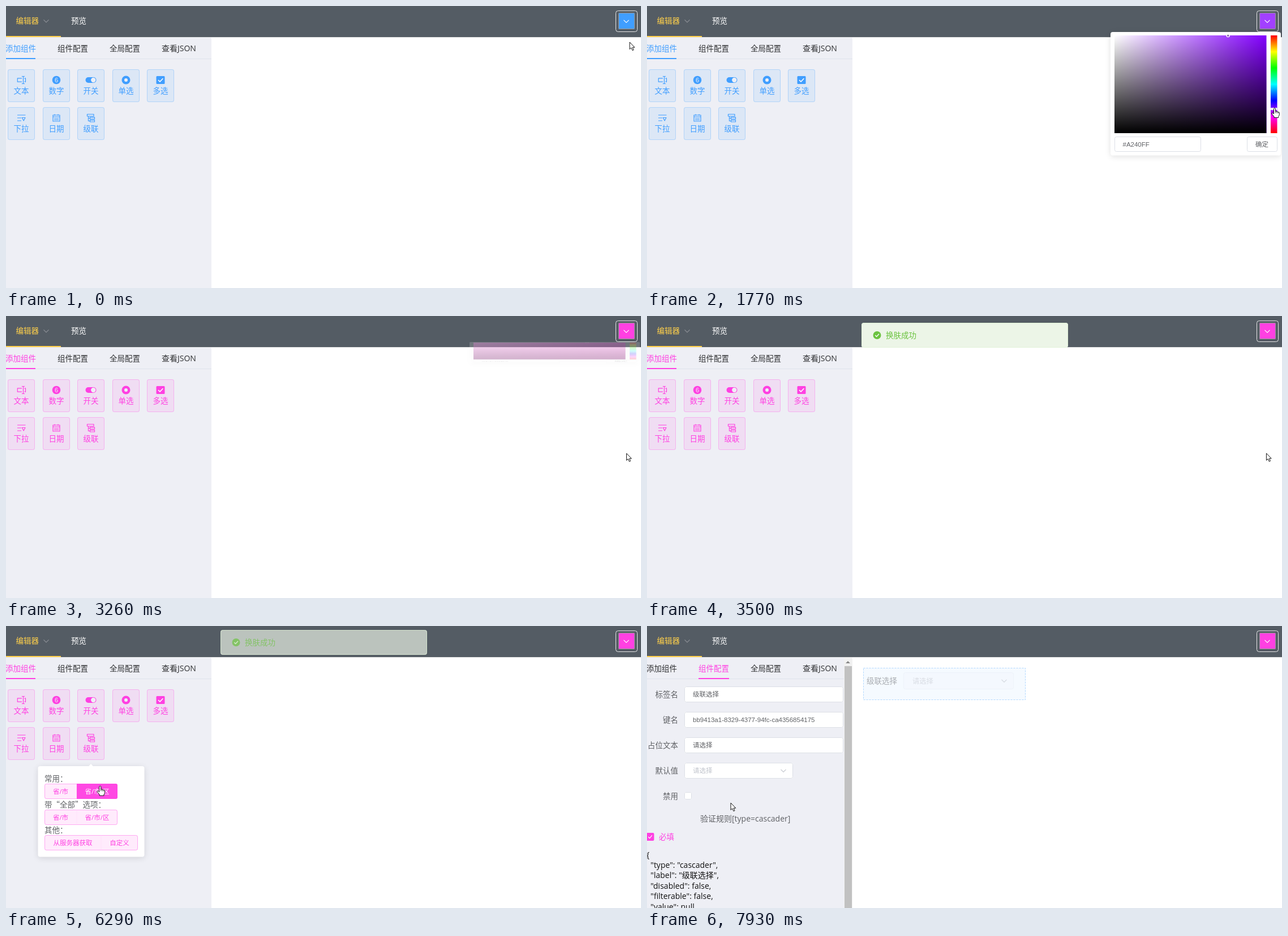
These frames come from a looping animation (1122 by 499 pixels, 8000 ms). An HTML page with a canvas:

```html
<!DOCTYPE html>
<html lang="zh-CN">
<head>
<meta charset="utf-8">
<style>
html, body { margin: 0; width: 100%; height: 100%; overflow: hidden; background: #fff; }
canvas { display: block; }
</style>
</head>
<body>
<canvas id="stage" width="1122" height="499"></canvas>
<script>
const ctx = document.getElementById('stage').getContext('2d');
const LOOP = 8000;
const CJK = '"Noto Sans CJK SC", sans-serif';
const MIXED = '"Open Sans", ' + CJK;
const ARIAL = '"Liberation Sans", ' + CJK;
const BLUE = [64, 158, 255];
const PANEL = '#eeeff5', DARK = '#303133', GREY = '#606266', LINE = '#dcdfe6', PALE = '#c0c4cc';

// Cursor hot spot: time, x, y
const CURSOR = [
  [70, 1102, 64], [380, 1092, 27], [620, 1092, 27], [850, 1090, 39], [1390, 1109, 154],
  [1460, 1109, 156], [1930, 1109, 193], [2240, 1109, 193], [2330, 1109, 196], [2480, 1109, 200],
  [2940, 1097, 243], [3500, 1096, 243], [3960, 366, 196], [4300, 235, 160], [4810, 180, 204],
  [5040, 167, 215], [5120, 165, 216], [5270, 163, 220], [5510, 150, 255], [5660, 115, 300],
  [5900, 105, 366], [6140, 100, 292], [6280, 166, 283], [6430, 170, 285], [6600, 198, 268],
  [6820, 120, 366], [6920, 95, 340], [7070, 95, 340], [7300, 160, 340], [7450, 152, 336],
  [7610, 152, 336], [7930, 148, 313]
];
const HUE = [[1390, 210.47], [1930, 296], [2240, 296], [2330, 302], [2480, 309.1]];

const circle = (r, x = 0) => `M${x - r} 0a${r} ${r} 0 1 0 ${2 * r} 0a${r} ${r} 0 1 0 ${-2 * r} 0Z`;
const COMPONENTS = [
  { name: '文本', line: 'M1-3.2H-6.7V3.2H1M.8-6.5H6.2M3.5-6.5V6.5M.8 6.5H6.2M5.5-3.2H7.5V3.2H5.5' },
  { name: '数字', fill: circle(7.3), digit: '6' },
  { name: '开关', fill: 'M-4.5-5H4.5a5 5 0 0 1 0 10H-4.5a5 5 0 0 1 0-10Z', hole: circle(4.2, 4.3) },
  { name: '单选', fill: circle(7.5), hole: circle(3) },
  { name: '多选', fill: 'M-6-7H6Q7.5-7 7.5-5.5V5.5Q7.5 7 6 7H-6Q-7.5 7-7.5 5.5V-5.5Q-7.5-7-6-7Z', tick: 'M-4 0L-1 3L4.3-2.8' },
  { name: '下拉', line: 'M-7-5H7.5M-7 0H0M-7 5H0M1.3-.5H7L4.2 5Z' },
  { name: '日期', line: 'M-6-5H6V6H-6ZM-6-2H6M-3-6.5V-4M3-6.5V-4M-4 1H4M-4 3.5H4' },
  { name: '级联', line: 'M-6.5-6.5H5V-3H-6.5ZM-1.5-1.2H6.5V2H-1.5ZM-1.5 3.8H6.5V7H-1.5ZM-4.5-3V5.5H-1.5M-4.5.5H-1.5' }
];
const POPOVER = [
  { y: 279, title: '常用：', items: [['省/市', 68, 57], ['省/市/区', 125, 72]] },
  { y: 325, title: '带“全部”选项：', items: [['省/市', 68, 57], ['省/市/区', 125, 72]] },
  { y: 370, title: '其他：', items: [['从服务器获取', 68, 100], ['自定义', 168, 65]] }
];
const JSON_LINES = ['{', '  "type": "cascader",', '  "label": "级联选择",', '  "disabled": false,', '  "filterable": false,', '  "value": null,'];

let now, theme, hotAreas;

const clamp = v => Math.max(0, Math.min(1, v));
const progress = (start, length) => clamp((now - start) / length);
const mix = (a, b, p) => a + (b - a) * p;
const rgb = (c, a = 1) => `rgba(${c.join()},${a})`;

function track(keys, t) {
  const i = keys.findIndex(k => k[0] > t);
  if (i === 0) return keys[0].slice(1);
  if (i < 0) return keys[keys.length - 1].slice(1);
  const a = keys[i - 1], b = keys[i];
  return a.slice(1).map((v, n) => mix(v, b[n + 1], (t - a[0]) / (b[0] - a[0])));
}

// CSS "ease" curve
function ease(p) {
  let lo = 0, hi = 1, u;
  for (let i = 0; i < 20; i++) {
    u = (lo + hi) / 2;
    if (.75 * u * (1 - u) + u ** 3 < p) lo = u; else hi = u;
  }
  return .3 * (1 - u) ** 2 * u + 3 * (1 - u) * u * u + u ** 3;
}

// Hue to RGB; low is the smallest channel value
function hueColor(h, low) {
  return [5, 3, 1].map(n => {
    const k = (n + h / 60) % 6;
    return Math.round(255 - (255 - low) * Math.max(0, Math.min(k, 4 - k, 1)));
  });
}

function box(x, y, w, h, fill, border, r = 3) {
  ctx.beginPath();
  ctx.roundRect(x, y, w, h, r);
  ctx.fillStyle = fill;
  ctx.fill();
  if (!border) return;
  ctx.beginPath();
  ctx.roundRect(x + .5, y + .5, w - 1, h - 1, r);
  ctx.strokeStyle = border;
  ctx.lineWidth = 1;
  ctx.stroke();
}

function text(s, x, cy, color, size = 13.5, align = 'left', font = CJK) {
  ctx.font = `${size}px ${font}`;
  ctx.textAlign = align;
  ctx.fillStyle = color;
  ctx.fillText(s, x, cy + size * .37);
}

function path(d, x, y, fill, stroke, width = 1.2) {
  ctx.save();
  ctx.translate(x, y);
  const p = new Path2D(d);
  if (fill) { ctx.fillStyle = fill; ctx.fill(p); }
  if (stroke) { ctx.strokeStyle = stroke; ctx.lineWidth = width; ctx.stroke(p); }
  ctx.restore();
}

const chevron = (x, y, color) => path('M-4.5-2.2L0 2.3L4.5-2.2', x, y, null, color, 1.1);

function layer(alpha, draw) {
  if (alpha <= 0) return;
  ctx.save();
  ctx.globalAlpha = alpha;
  draw();
  ctx.restore();
}

function floating(draw, alpha = .12) {
  ctx.save();
  ctx.shadowColor = `rgba(0,0,0,${alpha})`;
  ctx.shadowBlur = 11;
  ctx.shadowOffsetY = 2;
  draw();
  ctx.restore();
}

const inside = ([px, py], [x, y, w, h]) => px >= x && px < x + w && py >= y && py < y + h;

// Share of the last 100 ms spent over an area
function hoverAmount(area) {
  let n = 0;
  for (let i = 0; i < 10; i++) n += inside(track(CURSOR, now - i * 10), area);
  return n / 10;
}

function drawHeader(picked) {
  box(0, 0, 1122, 55, '#545c64', null, 0);
  box(0, 55, 1122, 1, '#e6e6e6', null, 0);
  box(0, 53, 97, 2, '#ffd04b', null, 0);
  text('编辑器', 17.5, 26.5, '#ffd04b');
  chevron(71, 26.5, '#909399');
  text('预览', 115, 26.5, '#fff');
  box(1077, 8, 39, 38, 'transparent', '#e6e6e6', 4);
  box(1082, 12, 29, 29, rgb(picked), '#999', 2);
  chevron(1096, 27, '#fff');
  hotAreas.push([1077, 8, 39, 38]);
}

function drawTabs(active) {
  box(0, 55, 363, 444, PANEL, null, 0);
  box(0, 93, 363, 1, '#dfe3ec', null, 0);
  const slide = ease(progress(7630, 280));
  box(mix(-1, 91, slide), 92, mix(53, 54, slide), 2, rgb(theme), null, 0);
  [['添加组件', -1], ['组件配置', 91], ['全局配置', 183], ['查看JSON', 275, 14]].forEach(([s, x, size], i) =>
    text(s, x, 75, i === active ? rgb(theme) : DARK, size, 'left', MIXED));
}

function drawComponents() {
  const color = rgb(theme);
  COMPONENTS.forEach((c, i) => {
    const x = Math.round(3 + i % 5 * 61.6), y = i < 5 ? 112 : 179, cx = x + 24, cy = y + 19;
    box(x, y, 48, 58, rgb(theme, .1), rgb(theme, .27));
    path(c.line || c.fill, cx, cy, c.fill && color, c.line && color);
    if (c.hole) path(c.hole, cx, cy, PANEL);
    if (c.tick) path(c.tick, cx, cy, null, '#fff', 1.6);
    if (c.digit) text(c.digit, cx, cy, PANEL, 11, 'center', ARIAL);
    text(c.name, cx, y + 38, color, 13.5, 'center');
    hotAreas.push([x, y, 48, 58]);
  });
}

function drawConfig() {
  const rows = [['标签名', '级联选择', 281], ['键名', 'bb9413a1-8329-4377-94fc-ca4356854175', 281],
    ['占位文本', '请选择', 281], ['默认值', '请选择', 192]];
  rows.forEach(([label, value, w], i) => {
    const cy = 121 + i * 45;
    text(label, 55, cy, GREY, 13.5, 'right');
    box(66, cy - 14, w, 28, '#fff', LINE);
    text(value, 81, cy, i === 3 ? PALE : GREY, 11.5, 'left', ARIAL);
  });
  chevron(241, 256, PALE);
  text('禁用', 55, 301, GREY, 13.5, 'right');
  box(66, 294, 13, 13, '#fff', LINE, 2);
  text('验证规则[type=cascader]', 94, 340.5, GREY, 14, 'left', MIXED);
  box(-1, 366, 13.5, 14, rgb(theme), null, 2);
  path('M-3.2 0L-.8 2.6L3.4-2.6', 5.5, 373, null, '#fff', 1.2);
  text('必填', 21, 373, rgb(theme));
  JSON_LINES.forEach((s, i) => text(s, -1, 404.5 + i * 18.4, '#111', 14, 'left', MIXED));
  box(348, 55, 15, 444, '#f1f1f1', null, 0);
  box(349, 71, 13, 428, '#c1c1c1', null, 0);
  path('M-4 2L0-2L4 2Z', 355, 64, '#858585');
}

function drawFormItem() {
  layer(.5 * progress(7700, 230), () => {
    box(382, 74, 287, 57, '#ecf5ff', null, 2);
    ctx.setLineDash([3, 2]);
    ctx.strokeStyle = '#6db5ff';
    ctx.lineWidth = 1;
    ctx.strokeRect(382.5, 74.5, 286, 56);
    ctx.setLineDash([]);
    text('级联选择', 388, 97, GREY);
    box(453, 82, 195, 30, '#f3f8fd', '#e8eef6');
    text('请选择', 469, 97, PALE, 12.3);
    chevron(631, 97, '#b4b8c0');
  });
}

function drawPicker(hue, picked) {
  const open = now < 3150 ? 1 - (1 - progress(600, 300)) ** 4 : (1 - progress(3150, 250)) ** 3;
  layer(open, () => {
    ctx.translate(0, 46 * (1 - open));
    ctx.scale(1, open);
    floating(() => box(819, 46, 301, 218.5, '#fff', null, 4));
    const shade = (x0, y0, x1, y1, stops, ...area) => {
      const g = ctx.createLinearGradient(x0, y0, x1, y1);
      stops.forEach((c, i) => g.addColorStop(i / (stops.length - 1), c));
      ctx.fillStyle = g;
      ctx.fillRect(...area);
    };
    const field = [826, 52, 268.5, 173];
    box(...field, rgb(hueColor(hue, 0)), null, 0);
    shade(826, 0, 1094, 0, ['#fff', 'rgba(255,255,255,0)'], ...field);
    shade(0, 52, 0, 225, ['rgba(0,0,0,0)', '#000'], ...field);
    shade(0, 52, 0, 225, ['#f00', '#ff0', '#0f0', '#0ff', '#00f', '#f0f', '#f00'], 1102, 52, 11.5, 173);
    box(1102, 51 + hue / 360 * 173 - 1, 11.5, 4, '#fff', '#f0f0f0', 1);
    path(circle(2.6), 1026.7, 52, 'rgba(0,0,0,.3)', '#fff', 1.5);
    box(826, 231, 153, 27, '#fff', LINE);
    const hex = '#' + picked.map(v => v.toString(16).padStart(2, '0')).join('').toUpperCase();
    text(hex, 840.5, 244.5, GREY, 11.5, 'left', ARIAL);
    box(1060, 231, 54, 27, '#fff', LINE);
    text('确定', 1086.5, 244.5, GREY, 11.5, 'center');
  });
  if (now > 620 && now < 3180) hotAreas.push([1101, 52, 14, 173], [1060, 231, 53, 27]);
}

function drawPopover() {
  const alpha = now < 7600 ? ease(progress(5230, 280)) : 1 - ease(progress(7600, 320));
  layer(alpha, () => {
    floating(() => box(56.5, 248, 188, 160.5, '#fff', null, 4));
    path('M-5.5 5L0-1L5.5 5Z', 150, 245, '#fff');
    POPOVER.forEach(({ y, title, items }) => {
      text(title, 68, y - 8.5, GREY);
      items.forEach(([label, x, w], i) => {
        const area = [x, y, w, 27], hover = hoverAmount(area);
        const corners = i ? [0, 3, 3, 0] : [3, 0, 0, 3];
        box(...area, rgb(theme, .1), rgb(theme, .38), corners);
        box(i ? x : x + w - 1, y + 1, 1, 25, '#ffe6fb', null, 0);
        box(...area, rgb(theme, hover * .95), null, corners);
        const ink = theme.map(v => Math.round(mix(v, 255, hover)));
        text(label, x + w / 2, y + 13.5, rgb(ink), 11.5, 'center', MIXED);
        if (now > 5400 && now < 7600) hotAreas.push(area);
      });
    });
  });
}

function drawMessage() {
  const leaving = now > 5000, start = leaving ? 6225 : 3260;
  const shown = length => {
    const e = ease(progress(start, length));
    return leaving ? 1 - e : e;
  };
  layer(shown(300), () => {
    ctx.translate(0, Math.round(-44 * (1 - shown(400))));
    box(379, 17, 365, 44, '#f0f9eb', '#e1f3d8', 4);
    path(circle(7), 406.5, 39, '#67c23a');
    path('M-3.3 0L-.9 2.5L3.5-2.3', 406.5, 39, null, '#fff', 1.4);
    text('换肤成功', 422, 39, '#67c23a');
  });
}

function drawCursor() {
  const pos = track(CURSOR, now);
  const hand = hotAreas.some(a => inside(pos, a));
  const shape = hand
    ? 'M-1.5 1Q0-1.2 1.5 1V6Q3 5 4 6.5Q5.5 5.8 6.3 7.2Q8 6.7 8.3 8.5V11.5Q8 14 6.7 15V17H-1V15.2L-5 10.5Q-5.6 8.6-4 8.6Q-2.8 9-1.5 10.6Z'
    : 'M0 0V12.5L2.8 9.9L4.9 14.6L7 13.7L5 9.2H8.8Z';
  ctx.lineJoin = 'round';
  path(shape, ...pos, '#fff', '#111', 1);
  if (hand) path('M1.5 6V9M4 6.5V9.3M6.3 7.2V9.5', ...pos, null, '#111', .8);
}

function render(t) {
  now = t;
  hotAreas = [];
  const [hue] = track(HUE, now);
  const picked = hueColor(hue, 64);
  const configuring = now >= 7630;
  theme = now < 3250 ? BLUE : picked;
  box(0, 0, 1122, 499, '#fff', null, 0);
  drawTabs(configuring ? 1 : 0);
  if (configuring) { drawConfig(); drawFormItem(); } else drawComponents();
  drawHeader(picked);
  drawPicker(hue, picked);
  drawPopover();
  drawMessage();
  drawCursor();
}

const began = performance.now();
function tick() {
  render((performance.now() - began) % LOOP);
  requestAnimationFrame(tick);
}
tick();
</script>
</body>
</html>
```
